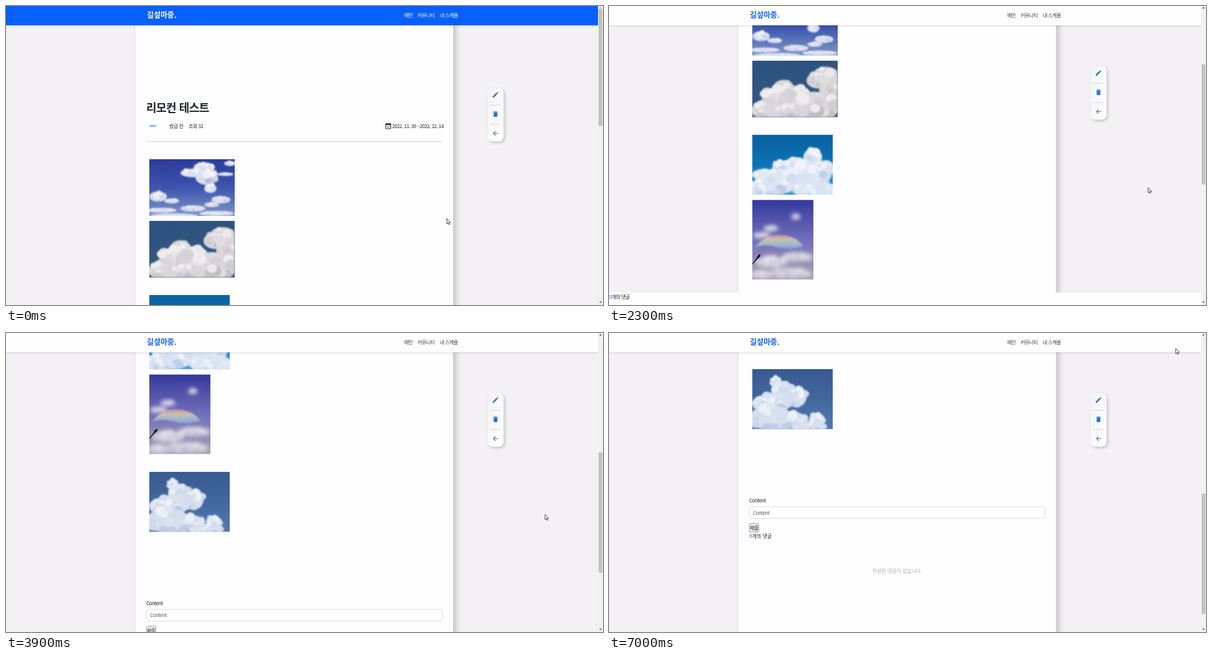
Write an HTML page that moves like this. It is 958 px wide and 480 px high and loops after 7.1 s.

```html
<!DOCTYPE html>
<html lang="ko">
<head>
<meta charset="utf-8">
<style>
  html, body { margin: 0; width: 100%; height: 100%; overflow: hidden; background: #f3f1f4; }
  svg { display: block; }
  text { font: 8px "Noto Sans CJK KR", "Noto Sans CJK", sans-serif; letter-spacing: -.5px; fill: #212529; white-space: pre; }
  .title { font-size: 18px; font-weight: 700; }
  .logo { font-size: 12px; font-weight: 900; letter-spacing: -.1px; }
  .avatar { font-size: 3px; font-weight: 900; letter-spacing: 0; fill: #0b62fb; }
  .wide { letter-spacing: 0; }
  .medium { font-weight: 500; }
  .count { fill: #1b66d6; }
  #card { filter: drop-shadow(4px 0 4px rgba(0,0,0,.22)); }
  #panel { filter: drop-shadow(2px 2px 2px rgba(0,0,0,.2)); }
  #header { filter: drop-shadow(0 1px 1.5px rgba(60,60,120,.2)); }
</style>
</head>
<body>
<svg id="stage" width="958" height="480" viewBox="0 0 958 480">
  <defs>
    <filter id="soft" x="-20%" y="-20%" width="140%" height="140%"><feGaussianBlur stdDeviation=".9"/></filter>
    <filter id="haze" x="-50%" y="-50%" width="200%" height="200%"><feGaussianBlur stdDeviation="3"/></filter>
    <linearGradient id="panelFill" x2="1" y2="1">
      <stop stop-color="#f3f2f6"/><stop offset="1" stop-color="#fff"/>
    </linearGradient>
    <linearGradient id="rainbow" x2="0" y2="1">
      <stop stop-color="#c99a9c"/><stop offset=".35" stop-color="#e8d3a8"/>
      <stop offset=".65" stop-color="#a9cbd4"/><stop offset="1" stop-color="#8ba6dc"/>
    </linearGradient>
  </defs>

  <rect id="card" x="208" y="-20" width="509.5" height="520" fill="#fefdff"/>

  <g id="page">
    <text class="title" x="225" y="170">리모컨 테스트</text>
    <text class="avatar" x="230" y="194">길섶마중.</text>
    <text x="262" y="196">방금 전</text>
    <text x="293" y="196">조회 32</text>
    <path transform="translate(607.5 187) scale(.5)" fill="#212529" d="M16.5 11 15.5 10l-4.9 4.9-2.1-2.1-1.1 1L10.6 17zM19 3h-1V1h-2v2H8V1H6v2H5a2 2 0 0 0-2 2v14a2 2 0 0 0 2 2h14a2 2 0 0 0 2-2V5a2 2 0 0 0-2-2zm0 16H5V8h14z"/>
    <text x="619.5" y="196">2022. 11. 30 ~2022. 12. 14</text>
    <path d="M225 217.3H700" stroke="#d2d1d5"/>
    <g id="photos"></g>
    <text x="225" y="939">Content</text>
    <rect x="225.3" y="946" width="474.5" height="18.5" rx="3" fill="#fff" stroke="#ced4da" stroke-width=".8"/>
    <text x="231" y="958.5" fill-opacity=".75">Content</text>
    <rect x="225.3" y="973" width="15" height="13.5" rx="1.2" fill="#efefef" stroke="#767676" stroke-width=".7"/>
    <text class="medium" x="226" y="983">제출</text>
    <text class="wide medium" x="225" y="996"><tspan class="count">0</tspan>개의 댓글</text>
    <text class="wide" x="462.5" y="1051.5" text-anchor="middle" style="fill:#adacb0">작성된 댓글이 없습니다.</text>
  </g>

  <g id="bar">
    <rect width="950" height="24" fill="#fefdff"/>
    <text x="0" y="9.5"><tspan class="count">0</tspan>개의 댓글</text>
  </g>

  <g id="remote">
    <rect id="panel" x="773" width="25.5" height="86" rx="7.5" fill="url(#panelFill)"/>
    <path d="M778 27.5H793.5M778 58.5H793.5" stroke="#cfced3"/>
    <g fill="#2b73d2">
      <path transform="translate(779.5 5) scale(.5)" d="M3 17.25V21h3.75L17.8 9.94l-3.75-3.75zM20.7 7.04a1 1 0 0 0 0-1.41l-2.34-2.34a1 1 0 0 0-1.41 0l-1.83 1.83 3.75 3.75z"/>
      <path transform="translate(779.5 36) scale(.5)" d="M6 19a2 2 0 0 0 2 2h8a2 2 0 0 0 2-2V7H6zM19 4h-3.5l-1-1h-5l-1 1H5v2h14z"/>
      <path transform="translate(779.5 67) scale(.5)" d="M20 11H7.83l5.59-5.59L12 4l-8 8 8 8 1.41-1.41L7.83 13H20z"/>
    </g>
  </g>

  <rect id="header" width="950" height="31"/>
  <text id="logo" class="logo" x="226" y="19">길섶마중.</text>
  <g id="nav">
    <text x="639" y="17.5">메인</text>
    <text x="660.3" y="17.5">커뮤니티</text>
    <text x="696" y="17.5">내 스케쥴</text>
  </g>

  <rect x="950" width="8" height="480" fill="#f1f0f2"/>
  <rect id="thumb" x="951" width="6" fill="#c1c0c3"/>
  <path id="up" d="M952 4l2-2.5 2 2.5z"/>
  <path d="M952 474.5l2 2.5 2-2.5z" fill="#505050"/>

  <path id="cursor" d="M0 0V8.2L1.9 6.5 3.2 9.4 4.5 8.8 3.2 6H5.8z" fill="#fff" stroke="#222" stroke-width=".8"/>
</svg>
<script>
const $ = id => document.getElementById(id);
const LOOP = 7100, STEP = 100;

let seed = 7;
const random = () => (seed = (seed * 16807) % 2147483647) / 2147483647;

// Each cloud is [centre x, centre y, radius x, radius y].
const photos = [
  { y: 246, w: 137, h: 91, sky: ['#2b3b98', '#3c55ae', '#7d96c8'], light: [246, 246, 252], dark: [158, 170, 210],
    clouds: [[88, 13, 17, 8], [70, 22, 20, 7], [92, 29, 18, 12], [98, 47, 10, 7], [129, 7, 9, 4], [122, 24, 13, 3],
      [14, 60, 14, 8], [36, 67, 12, 4], [115, 65, 15, 6], [100, 73, 12, 4], [20, 82, 24, 4], [70, 79, 20, 5], [108, 87, 28, 4], [40, 90, 38, 3]] },
  { y: 345, w: 137, h: 91, sky: ['#2e5280', '#30557f', '#35597f'], light: [238, 236, 238], dark: [168, 166, 173],
    clouds: [[118, 20, 19, 10], [106, 32, 19, 13], [125, 42, 18, 26], [50, 43, 16, 12], [38, 60, 22, 17],
      [72, 60, 24, 20], [20, 80, 22, 13], [100, 74, 40, 24], [55, 83, 35, 14]],
    over: '<path d="M0 90.6H136.6V0" fill="none" stroke="#6d7480" stroke-width=".8"/>' },
  { y: 464, w: 129, h: 96.5, sky: ['#08609f', '#0d74b5', '#52a2d6'], light: [240, 243, 250], dark: [172, 196, 228],
    clouds: [[97, 36, 15, 14], [70, 47, 18, 11], [47, 51, 15, 10], [20, 64, 21, 9], [90, 64, 36, 22],
      [40, 75, 36, 20], [118, 55, 14, 14], [14, 86, 22, 14], [100, 88, 36, 14]] },
  { y: 568.6, w: 98, h: 128, sky: ['#35389c', '#716fbb', '#a9a2ae'], light: [232, 230, 238], dark: [158, 152, 182], hazy: true,
    clouds: [[70, 27, 7, 5], [30, 46, 12, 5], [15, 57, 14, 5], [72, 92, 26, 8], [30, 100, 26, 9], [60, 118, 34, 9], [15, 120, 16, 8]],
    over: `<path d="M4 76Q22 54 46 56T82 74Q60 82 40 76T4 76z" fill="url(#rainbow)" opacity=".8" filter="url(#soft)"/>
      <path d="M0 102L7 93Q9 87 13 87.5Q14 91 8 95L0 104z" fill="#1d1822"/>` },
  { y: 725, w: 129, h: 96.5, sky: ['#385a92', '#42679f', '#5379ab'], light: [236, 240, 249], dark: [164, 183, 214],
    clouds: [[38, 20, 9, 9], [48, 33, 18, 14], [70, 45, 17, 16], [40, 52, 24, 16], [18, 55, 18, 13],
      [30, 78, 34, 20], [62, 82, 25, 14], [104, 82, 13, 11], [92, 92, 28, 9]] }
];

function puffs([cx, cy, rx, ry], light, dark) {
  const tint = k => `rgb(${light.map((c, i) => Math.round(c + (dark[i] - c) * k))})`;
  let shapes = `<ellipse cx="${cx}" cy="${cy}" rx="${rx}" ry="${ry}" fill="${tint(.3)}"/>`;
  for (let i = 0; i < 16; i++) {
    const angle = random() * 2 * Math.PI, reach = Math.sqrt(random()) * .92;
    const x = cx + Math.cos(angle) * reach * rx, y = cy + Math.sin(angle) * reach * ry;
    const shade = Math.max(0, Math.min(1, .25 + .4 * Math.sin(angle) * reach + (random() - .5) * .6));
    const r = Math.min(rx, ry) * (.2 + random() * .22);
    shapes += `<ellipse cx="${x}" cy="${y}" rx="${r * 1.2}" ry="${r}" fill="${tint(shade)}"/>`;
  }
  return shapes;
}

$('photos').innerHTML = photos.map((p, i) => `
  <svg x="230" y="${p.y}" width="${p.w}" height="${p.h}">
    <linearGradient id="sky${i}" x2="0" y2="1">
      ${p.sky.map((c, k) => `<stop offset="${k / 2}" stop-color="${c}"/>`).join('')}
    </linearGradient>
    <rect width="100%" height="100%" fill="url(#sky${i})"/>
    <g filter="url(#${p.hazy ? 'haze' : 'soft'})">${p.clouds.map(c => puffs(c, p.light, p.dark)).join('')}</g>
    ${p.over || ''}
  </svg>`).join('');

// Rows of [time, value, ...], linear in between.
const scrollPath = [[700, 0], [800, 20], [900, 75], [1000, 101.4], [1800, 201.8], [2800, 313],
  [3400, 463], [4000, 510], [4700, 551], [6100, 667]];
const cursorPath = [[100, 707.5, 341.5], [700, 865, 291.5], [5900, 865, 291.5], [6300, 911, 9],
  [6500, 908, 17], [6700, 908.5, 18], [6900, 908.5, 18], [7000, 909.5, 25]];

function along(path, t) {
  const next = path.findIndex(row => row[0] > t);
  if (next === 0) return path[0].slice(1);
  if (next < 0) return path[path.length - 1].slice(1);
  const a = path[next - 1], b = path[next], k = (t - a[0]) / (b[0] - a[0]);
  return a.slice(1).map((v, i) => v + (b[i + 1] - v) * k);
}

const easeOut = (t, start, duration = 300) => {
  const k = Math.max(0, Math.min(1, (t - start) / duration));
  return 1 - (1 - k) ** 2;
};
const mix = (a, b, k) => `rgb(${a.map((v, i) => Math.round(v + (b[i] - v) * k))})`;
const move = (id, x, y) => $(id).setAttribute('transform', `translate(${x} ${y})`);

function draw(t) {
  const [scroll] = along(scrollPath, t);
  const pinned = t >= 870;
  move('page', 0, -scroll);
  move('remote', 0, Math.max(96.5, 131.5 - scroll));
  move('cursor', ...along(cursorPath, t));

  $('header').setAttribute('fill', mix([8, 96, 251], [254, 253, 255], easeOut(t, 870)));
  $('logo').style.fill = pinned ? '#0b62fb' : '#fff';
  for (const item of $('nav').children) item.style.fill = pinned ? '#3d3f44' : '#fff';

  move('bar', 0, 480 - 20 * easeOut(t, 1680));
  $('bar').style.display = t >= 1680 && scroll < 490 ? '' : 'none';

  $('thumb').setAttribute('y', pinned ? 31 + (scroll - 101.4) * .4015 : 5 + scroll * .4);
  $('thumb').setAttribute('height', pinned ? 193 : 187.5);
  $('up').setAttribute('fill', scroll > 0 ? '#505050' : '#a3a3a3');
}

function frame() {
  const t = performance.now() % LOOP;
  draw(Math.floor(t / STEP) * STEP);
  requestAnimationFrame(frame);
}
frame();
</script>
</body>
</html>
```
